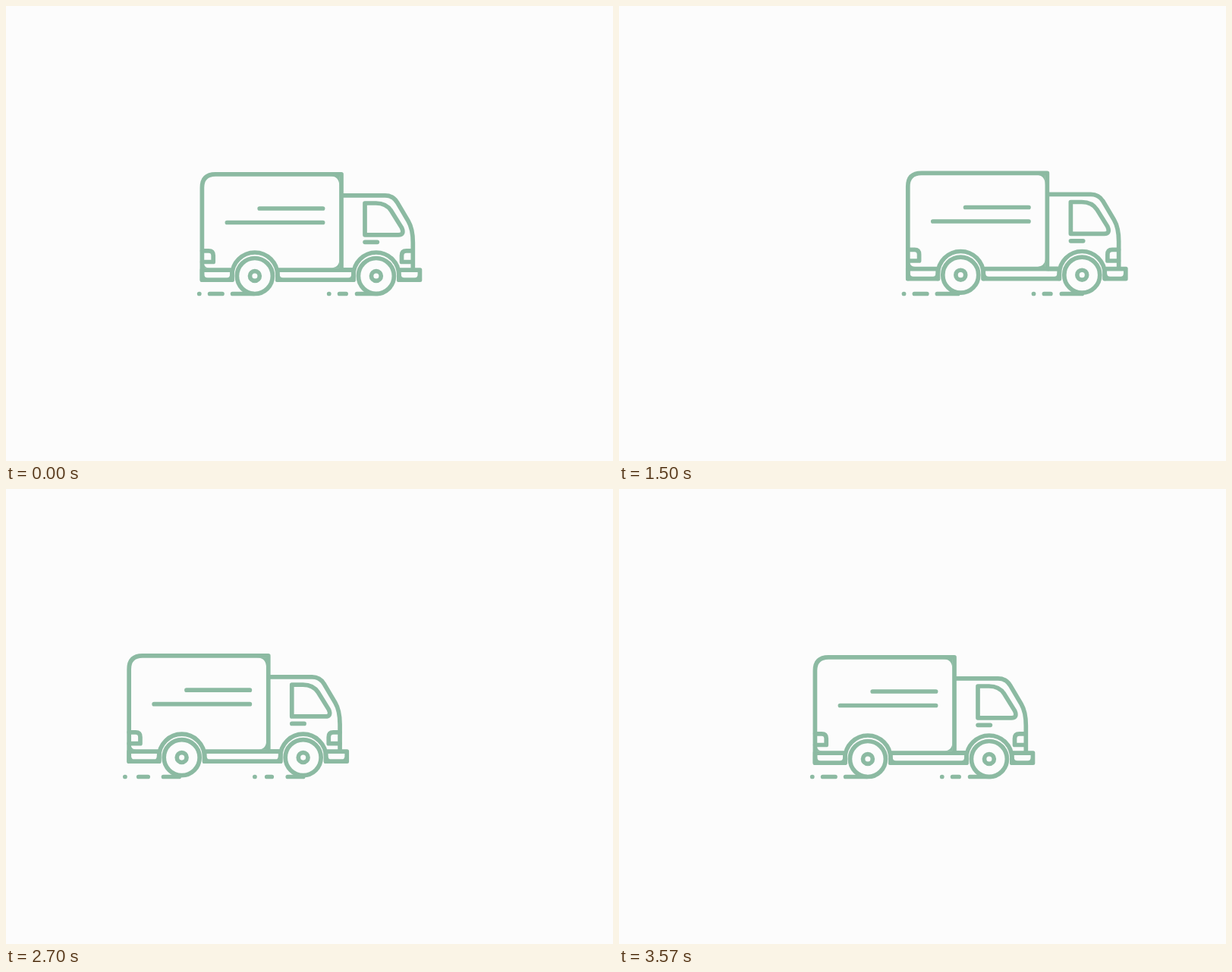
Write an HTML page that moves like this. It is 800 by 600 pixels and loops after 3600 ms.

```html
<!DOCTYPE html>
<html lang="en">
<head>
<meta charset="utf-8">
<title>Delivery truck</title>
<style>
  html, body { margin: 0; width: 100%; height: 100%; overflow: hidden; background: #fcfcfc; }
  svg { display: block; width: 100vw; height: 100vh; }
  .line { fill: none; stroke: #8cbaa2; stroke-width: 5.7; stroke-linecap: round; stroke-linejoin: round; }
  .butt { stroke-linecap: butt; }
  .solid { fill: #8cbaa2; }
  .gap { fill: #fcfcfc; }
</style>
</head>
<body>
<svg viewBox="0 0 800 600">
  <g id="ground" class="line"></g>
  <g id="wheels" class="line"></g>
  <g id="body">
    <g id="bumpers"></g>
    <g class="solid">
      <path d="M427 224Q439.8 224 439.8 238V224Z"/>
      <path d="M427 345.6Q439.8 345.6 439.8 334V345.6Z"/>
      <path d="M261 339Q262 345.5 268 345.5H261Z"/>
    </g>
    <g class="line">
      <!-- cargo box -->
      <path d="M258.8 361V239.5Q258.8 221.8 276.5 221.8H442.4V348"/>
      <path d="M334.6 267H418M291.8 285.5H418"/>
      <!-- cab, window, handle -->
      <path class="butt" d="M442 249.8H500Q510.5 249.8 516 259L530.5 283.5Q536.7 294 536.7 312V348"/>
      <path d="M473.4 260H488Q501.5 260 508 270L522 292.5Q526 301.8 517.5 301.8H473.4Z"/>
      <path d="M473.5 311.3H489.7"/>
      <!-- lamps -->
      <path d="M259 322.8H267.5Q273.6 322.8 273.6 329V337.5H259"/>
      <path d="M536.5 322.8H528Q521.9 322.8 521.9 329V337.5H536.5"/>
      <!-- chassis and arches -->
      <path class="butt" d="M443 348H460"/>
      <path d="M298.3 361V355A30 30 0 0 1 358.3 355V361M458.3 361V355A30 30 0 0 1 518.3 355V361"/>
    </g>
  </g>
</svg>
<script>
const LOOP = 3600, STEP = 30;
const LEAVE = 750, GONE = 1830, ENTER = 2220;
const el = id => document.getElementById(id);
const ground = el("ground"), wheels = el("wheels"), body = el("body");

const bumper = (l, r) =>
  `<rect class="solid" x="${l}" y="345.2" width="${r - l}" height="18.7" rx="2.5"/>` +
  `<path class="gap" d="M${l + 5.7} 350.9H${r - 5.7}V354Q${r - 5.7} 358.2 ${r - 9.5} 358.2H${l + 10}Q${l + 5.7} 358.2 ${l + 5.7} 354Z"/>`;
el("bumpers").innerHTML = bumper(256, 301.2) + bumper(355.4, 461.2) + bumper(515.4, 548.7);

wheels.innerHTML = [328.3, 488.3].map(x =>
  `<circle cx="${x}" cy="356" r="23.5"/><circle cx="${x}" cy="356" r="6.4"/>`).join("");

const part = (t, from, to) => Math.min(1, Math.max(0, (t - from) / (to - from)));
const ease = (t, from, to) => (1 - Math.cos(Math.PI * part(t, from, to))) / 2;

// Strength of a bounce: quick rise to its peak, slow decay to its end
const decay = (t, peak, end) => part(t, peak - 150, peak) * Math.pow(1 - part(t, peak, end), 1.7);
const swing = (t, peak) => Math.cos(2 * Math.PI * (t - peak) / 300);

const bodyY = (t, peak, end) => -decay(t, peak, end) * (2 + 4 * swing(t, peak));
const wheelY = (t, peak, end) => -5 * decay(t, peak, end) * Math.max(0, swing(t, peak));

function truckX(t) {
  if (t < LEAVE) return -0.4 * (1 - part(t, 0, 60));
  if (t < GONE) {
    // Backs up a little, then speeds away
    return -5.5 * ease(t, LEAVE, 1050) + 1241 * Math.pow(Math.max(0, t - 1050) / 1000, 2.85);
  }
  // Rolls in, overshoots and settles
  return 6 - 154.8 * Math.pow((LOOP - t) / 1000, 3.9) - 6.4 * ease(t, 3270, 3570);
}

// 0 is full length, larger values shorten the ground lines
function shortening(t) {
  if (t < LEAVE) return 0;
  if (t < GONE) return 1.8 * Math.pow(1 - part(t, 1110, 1500), 2);
  return 0.62 * Math.sin(Math.PI * part(t, 2490, 3570));
}

function groundPath(q) {
  const seg = (a, b) => `M${Math.min(a, b - 0.01)} 379.5H${b}`;
  let d = seg(297.4 + 19 * q, 324.8) + seg(461.4 + 18.4 * q, 488.3);
  if (q < 1.5) d += seg(267.4 + 11.2 * q, 283.8) + seg(438.4 + 5.6 * q, 446.9);
  if (q < 1.2) d += seg(253.5, 253.6) + seg(424.5, 424.6);
  return `<path d="${d}"/>`;
}

const move = (node, x, y) => node.setAttribute("transform", `translate(${x} ${y})`);

function draw(t) {
  const away = t >= GONE && t < ENTER;
  for (const node of [ground, wheels, body]) node.style.display = away ? "none" : "";
  if (away) return;
  const x = truckX(t), resting = t < LEAVE, leaving = t < GONE;
  move(body, x, leaving ? bodyY(t, 1170, 1800) : bodyY(t, 2340, LOOP));
  move(wheels, x, leaving ? wheelY(t, 1230, 1800) : wheelY(t, 2445, LOOP));

  const bare = !resting && t < 1110;
  ground.innerHTML = bare ? "" : groundPath(shortening(t));
  move(ground, resting ? 1.2 : x + 1.6 * ease(t, 3000, 3570) * !leaving, 0);
}

const start = performance.now();
function tick() {
  const t = (performance.now() - start) % LOOP;
  draw(Math.floor(t / STEP) * STEP);
  requestAnimationFrame(tick);
}
tick();
</script>
</body>
</html>
```
